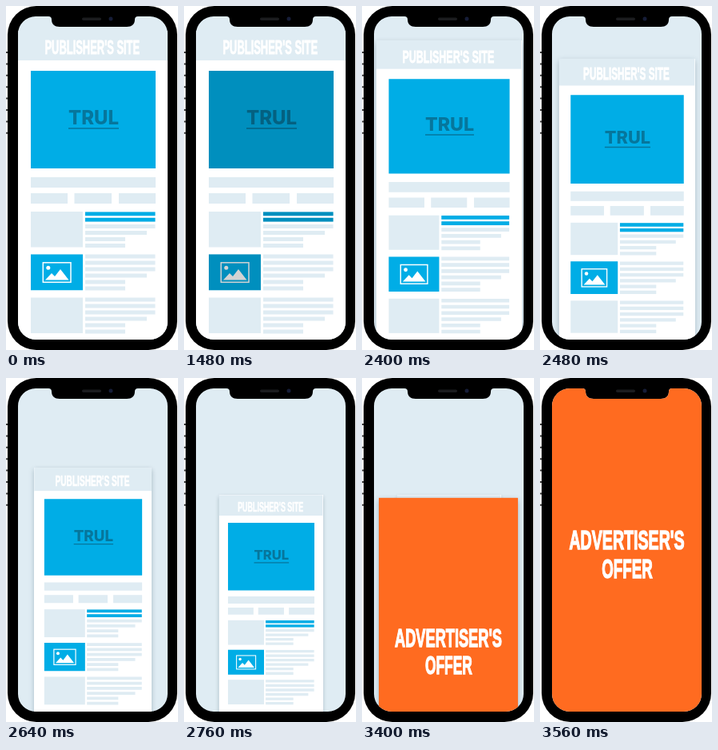
These frames come from a looping animation (215x430 px, 4800 ms). An HTML page:

```html
<!DOCTYPE html>
<html lang="en">
<head>
<meta charset="utf-8">
<title>Publisher to advertiser</title>
<style>
  html, body { margin: 0; width: 100%; height: 100%; overflow: hidden; background: #fff; }
  svg { display: block; width: 100%; height: 100%; }
  .pale { fill: #dfecf3; }
  .blue { fill: #00ade6; }
  .lines { fill: none; stroke: #dfecf3; stroke-width: 4.8; }
  .caps { font: 700 23.5px "Liberation Sans", Arial, sans-serif; fill: #fff; stroke: #fff; stroke-width: .9; text-anchor: middle; }
  .big { font-size: 34px; stroke-width: 1.6; }
  .link { font: 800 24px Inter, "Open Sans", sans-serif; fill: #06769c; text-anchor: middle; }
  .soft { filter: drop-shadow(0 3px 4px rgba(0, 40, 60, .28)); }
  .page, .card, .shade, .press { animation: 4.8s linear infinite; }
  .page { animation-name: shrink; }
  .shade { animation-name: lift; }
  .press { animation-name: press; }
  .card { animation-name: rise; }

  @keyframes press {
    0%, 30.8332% { opacity: 0; }
    30.8333% { opacity: .17; }
    40.8333%, 100% { opacity: 0; }
  }
  @keyframes lift {
    0%, 49.1665% { opacity: 0; }
    49.1666%, 100% { opacity: 1; }
  }
  @keyframes shrink {
    0%, 49.1666% { transform: translate(0, 0) scale(1); }
    57.5%, 100% { transform: translate(33.57px, 124.95px) scale(.692); }
  }
  @keyframes rise {
    0%, 66.6665% { transform: translate(16.45px, 312.1px) scale(.837); opacity: 0; }
    66.6666% { transform: translate(16.45px, 312.1px) scale(.837); opacity: 1; }
    74.1666%, 100% { transform: translate(0, 0) scale(1); opacity: 1; }
  }
</style>
</head>
<body>
<svg viewBox="0 0 215 430">
  <defs>
    <clipPath id="screen">
      <path d="M15 35a22 22 0 0 1 22-22H53q4 0 4 4c0 6 4 9 10 9H151c6 0 10-3 10-9q0-4 4-4H180a22 22 0 0 1 22 22V395a22 22 0 0 1-22 22H37a22 22 0 0 1-22-22Z"/>
    </clipPath>
    <path id="hot" d="M31 81H187V203H31ZM99 257.400H186.500V262.300H99ZM99 264.800H186.500V269.600H99ZM31 310.500H96V355.300H31Z"/>
    <g id="para">
      <rect class="pale" x="31" width="65" height="44.500"/>
      <path class="lines" d="M99 2.500H186.500M99 10.500H186.500M99 18.500H186.500M99 26.500H176M99 34.500H149M99 42.500H149"/>
    </g>
  </defs>

  <rect x="2" width="212" height="430" rx="36"/>
  <path d="M1 57V160" stroke="#000" stroke-width="1.500" stroke-dasharray="2 12.400"/>

  <g clip-path="url(#screen)">
    <rect class="pale" width="215" height="430"/>
    <g class="page">
      <g class="shade"><rect class="soft pale" x="15" y="31" width="187" height="480"/></g>
      <rect class="pale" x="15" y="31" width="187" height="38"/>
      <rect x="15" y="68" width="187" height="443" fill="#fff"/>
      <text class="caps" transform="translate(107.800 60.300) scale(.55 1)">PUBLISHER'S SITE</text>

      <path class="pale" d="M31 214H187V227H31ZM31 234H77V247H31ZM85.500 234H132V247H85.500ZM141 234H187V247H141Z"/>
      <use href="#para" y="257"/>
      <use href="#para" y="310.500"/>
      <use href="#para" y="364.500"/>

      <use class="blue" href="#hot"/>
      <text class="link" x="109.500" y="148">TRUL</text>
      <path d="M78 153H141" stroke="#06769c" stroke-width="1.600"/>
      <rect x="46.300" y="320.800" width="34.700" height="24.500" fill="none" stroke="#fff" stroke-width="1.500"/>
      <circle cx="52.800" cy="327.300" r="2.500" fill="#fff"/>
      <path d="M49 342.500L57 334L61 338L68 329L78.500 342.500Z" fill="#fff"/>
      <use class="press" href="#hot"/>
    </g>

    <g class="card">
      <rect class="soft" x="15" y="13" width="187" height="404" fill="#ff6b20"/>
      <rect x="15" y="13" width="187" height="404" fill="#ff6b20"/>
      <text class="caps big" transform="translate(108.500 214) scale(.577 1)">ADVERTISER'S</text>
      <text class="caps big" transform="translate(109 250) scale(.55 1)">OFFER</text>
    </g>
  </g>

  <rect x="95" y="14.500" width="24" height="3.500" rx="1.750" fill="#1b1c1f"/>
  <circle cx="131" cy="16" r="2.500" fill="#161d38"/>
</svg>
</body>
</html>
```
